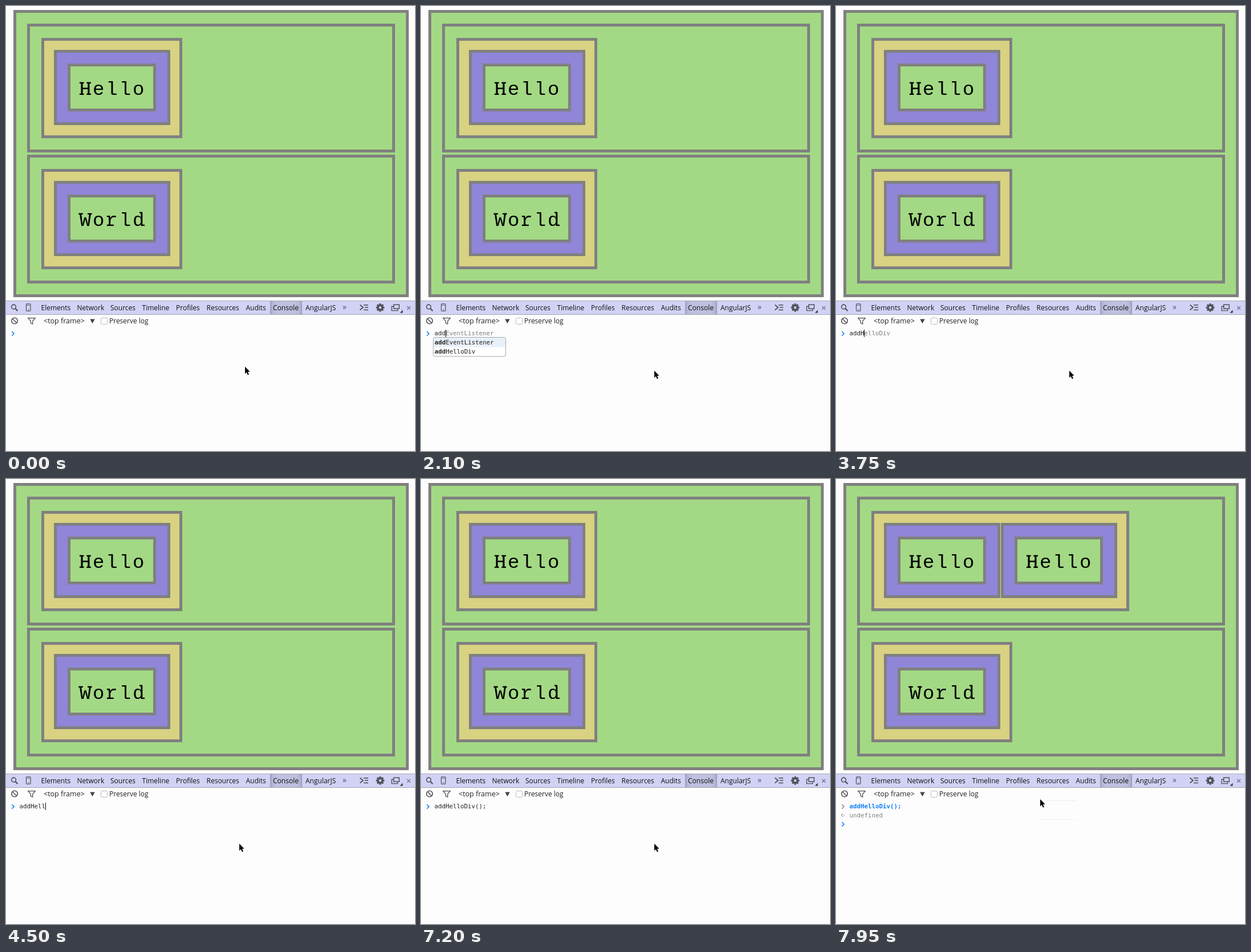
An HTML page with a canvas for the animation above (8 s loop, 717x781 px).

```html
<!DOCTYPE html>
<html lang="en">
<head>
<meta charset="utf-8">
<title>Console demo</title>
<style>
  html, body { margin: 0; width: 100%; height: 100%; overflow: hidden; background: #fdfdfd; }
  canvas { display: block; }
</style>
</head>
<body>
<canvas id="stage" width="717" height="781"></canvas>
<script>
const ctx = document.getElementById('stage').getContext('2d');
const LOOP = 8000;
const GREEN = '#a3d984', YELLOW = '#d8d282', PURPLE = '#8f86d9', GRAY = '#808080';
const BLUE = '#1080f5', ICON = '#505058', INK = '#222';
const UI = '"Open Sans", "Noto Sans", sans-serif';
const MONO = '10.8px "DejaVu Sans Mono", monospace';
const COMMAND = 'addHelloDiv();';
const PITCH = 6.5;

// [time, typed characters, inline hint, popup prefix length, caret]
const EVENT = 'addEventListener', DIV = 'addHelloDiv';
const STEPS = [
  [0, 0, '', 0, 0], [150, 0, '', 0, 1], [750, 0, '', 0, 0], [1200, 0, '', 0, 1],
  [1500, 1, '', 0, 1], [1800, 2, EVENT, 2, 1], [2100, 3, EVENT, 3, 1],
  [3600, 4, '', 3, 1], [3750, 4, DIV, 0, 1], [4200, 5, '', 0, 1],
  [4350, 6, DIV, 0, 1], [4500, 7, '', 0, 1], [4800, 8, '', 0, 1],
  [5100, 8, DIV, 0, 1], [5400, 9, '', 0, 1], [5550, 9, DIV, 0, 1],
  [5700, 10, '', 0, 1], [5850, 11, '', 0, 1], [6300, 13, '', 0, 1],
  [6750, 14, '', 0, 1], [7200, 14, '', 0, 0]
];
const RUN = 7350, CARET_OFF = 7800, LEAVE = 7950;

// Slab serifs as [left, right, height above baseline]
const SLABS = {
  H: [[1.6, 9.2, 0], [14, 21.6, 0], [1.6, 9.2, 20], [14, 21.6, 20]],
  W: [[0, 7.5, 20], [15.8, 23.3, 20]],
  r: [[3, 15, 0], [3, 8, 15.6]],
  d: [[18, 22.5, 0], [13.5, 18.2, 22.2]]
};

function rect(x, y, w, h, color) {
  ctx.fillStyle = color;
  ctx.fillRect(x, y, w, h);
}

function text(s, x, y, font, color = INK) {
  ctx.font = font;
  ctx.fillStyle = color;
  ctx.fillText(s, x, y);
}

function line(points, color = ICON, width = 1.5, close = false) {
  ctx.beginPath();
  points.forEach(([x, y]) => ctx.lineTo(x, y));
  if (close) ctx.closePath();
  ctx.strokeStyle = color;
  ctx.lineWidth = width;
  ctx.stroke();
}

function shape(points, color) {
  ctx.beginPath();
  points.forEach(([x, y]) => ctx.lineTo(x, y));
  ctx.closePath();
  ctx.fillStyle = color;
  ctx.fill();
}

function ring(x, y, r, width, color = ICON) {
  ctx.beginPath();
  ctx.arc(x, y, r, 0, Math.PI * 2);
  ctx.strokeStyle = color;
  ctx.lineWidth = width;
  ctx.stroke();
}

function box(x, y, right, bottom, color) {
  rect(x, y, right - x, bottom - y, GRAY);
  rect(x + 5, y + 5, right - x - 10, bottom - y - 10, color);
}

function word(s, x, y) {
  ctx.textAlign = 'center';
  [...s].forEach((ch, i) => {
    const left = x + i * 23.3;
    text(ch, left + 11.65, y, '34px "Liberation Mono", monospace', '#000');
    for (const [a, b, up] of SLABS[ch] || []) rect(left + a, y - up - 2.4, b - a, 2.4, '#000');
  });
  ctx.textAlign = 'left';
}

function card(s, x, y) {
  box(x, y, x + 204, y + 132, PURPLE);
  box(x + 24, y + 24, x + 179, y + 108, GREEN);
  word(s, x + 43.3, y + 79);
}

function row(s, y, count) {
  box(37, y, 682, y + 226, GREEN);
  box(62, y + 25, count > 1 ? 514 : 309, y + 201, YELLOW);
  for (let i = 0; i < count; i++) card(s, 84 + i * 205, y + 46.5 | 0);
}

function page(count) {
  box(13, 7, 706, 511, GREEN);
  row('Hello', 31, count);
  row('World', 261, 1);
}

function gear(x, y) {
  ctx.save();
  ctx.translate(x, y);
  for (let i = 0; i < 8; i++) {
    rect(-1.6, -7.3, 3.2, 4, ICON);
    ctx.rotate(Math.PI / 4);
  }
  ctx.restore();
  ring(x, y, 3.9, 3.4);
}

function tabs() {
  rect(0, 517, 717, 24, '#d2d2f6');
  rect(0, 517, 717, 1, '#a9a9b4');
  rect(0, 541, 717, 1, '#a5a5ad');

  const shade = ctx.createLinearGradient(463, 0, 519, 0);
  [[0, '#9898b2'], [0.06, '#b4b4d2'], [0.2, '#bfbfdf'], [0.8, '#bfbfdf'], [0.94, '#b4b4d2'], [1, '#9898b2']]
    .forEach(([at, color]) => shade.addColorStop(at, color));
  rect(463, 518, 56, 23, shade);

  const labels = [
    ['Elements', 61.5], ['Network', 124.5], ['Sources', 183], ['Timeline', 238.5],
    ['Profiles', 298], ['Resources', 351.5], ['Audits', 420.5], ['Console', 468], ['AngularJS', 525]
  ];
  labels.forEach(([s, x]) => text(s, x, 533.5, '12px ' + UI, '#111'));
  text('»', 590, 533, '14px ' + UI, ICON);

  ring(13.5, 528, 3.9, 1.6);
  line([[16.4, 531], [20.5, 535.3]], ICON, 2.3);

  ctx.beginPath();
  ctx.roundRect(35.5, 522.5, 7.5, 13, 1.5);
  ctx.strokeStyle = ICON;
  ctx.lineWidth = 1.2;
  ctx.stroke();
  rect(36, 524.5, 6.5, 1, ICON);
  rect(38, 533, 3, 1, ICON);

  line([[620.5, 524.5], [626, 529], [620.5, 533.5]], ICON, 1.8);
  rect(627, 524, 8, 1.6, ICON);
  rect(629, 528.2, 6, 1.6, ICON);
  rect(627, 532.6, 8, 1.6, ICON);
  gear(656, 529.3);

  ctx.strokeStyle = ICON;
  ctx.lineWidth = 1.5;
  ctx.strokeRect(679.7, 524.2, 9.6, 7);
  line([[679, 527.2], [676.2, 527.2], [676.2, 534.6], [686.5, 534.6], [686.5, 532]], ICON, 1.4);
  shape([[695.5, 533.5], [695.5, 538.5], [690.5, 538.5]], '#333');
  line([[703.2, 527], [709, 532.8]], '#77778a', 1.4);
  line([[709, 527], [703.2, 532.8]], '#77778a', 1.4);
}

function filters() {
  ring(15, 552.5, 5.3, 1.6);
  line([[11.3, 548.8], [18.7, 556.2]], ICON, 1.6);
  line([[38.8, 547.7], [51.2, 547.7], [46.7, 553], [46.7, 558], [43.3, 556.5], [43.3, 553]], ICON, 1.3, true);
  text('<top frame>', 66, 556.5, '12.5px ' + UI);
  shape([[147.3, 549.5], [155.7, 549.5], [151.5, 557.3]], '#444');
  ctx.beginPath();
  ctx.roundRect(166.5, 547.5, 11, 11, 2);
  ctx.fillStyle = '#fff';
  ctx.fill();
  ctx.strokeStyle = '#bbb';
  ctx.lineWidth = 1;
  ctx.stroke();
  text('Preserve log', 181, 556.8, '12px ' + UI);
}

function prompt(y, color) {
  line([[10.3, y - 3.7], [14, y], [10.3, y + 3.7]], color, 1.6);
}

function caret(n, y) {
  rect(Math.floor(24 + n * 6.49), y, 1, 13, '#111');
}

function popup(prefix) {
  ctx.beginPath();
  ctx.roundRect(21.5, 581.5, 127, 33.5, 3);
  ctx.fillStyle = '#fff';
  ctx.fill();
  rect(22, 582, 126, 16.5, '#e8f0fa');
  ctx.strokeStyle = '#a4a8ac';
  ctx.lineWidth = 1;
  ctx.stroke();
  [EVENT, DIV].forEach((s, i) => {
    const y = 593.5 + i * 16.3;
    text(s.slice(0, prefix), 23.7, y, 'bold ' + MONO);
    text(s.slice(prefix), 23.7 + prefix * PITCH, y, MONO);
  });
}

function typing(t) {
  const [, n, hint, prefix, blink] = STEPS.findLast(step => t >= step[0]);
  prompt(575, BLUE);
  text(COMMAND.slice(0, n), 23.5, 578, MONO);
  if (hint) text(hint.slice(n), 23.5 + n * PITCH, 578, MONO, GRAY);
  if (prefix) popup(prefix);
  if (blink) caret(n, 568);
}

function result(t) {
  prompt(575, '#8a8a8a');
  text(COMMAND, 23.5, 578, 'bold ' + MONO, BLUE);
  line([[12.3, 587], [9.5, 590], [12.3, 593]], '#a0a0a0', 1.2);
  rect(13.5, 589.3, 1.8, 1.4, '#a0a0a0');
  text('undefined', 23.5, 593.7, MONO, GRAY);
  prompt(606, BLUE);
  if (t < CARET_OFF) caret(0, 599);
}

function pointer(x, y) {
  const arrow = [[0, 0], [0, 12.4], [2.8, 9.8], [4.8, 14.6], [6.9, 13.7], [4.9, 9.1], [8.5, 8.8]]
    .map(([dx, dy]) => [x + dx, y + dy]);
  line(arrow, '#fff', 1.8, true);
  shape(arrow, '#000');
}

function draw(t) {
  rect(0, 0, 717, 781, '#fdfdfd');
  page(t < RUN ? 1 : 2);
  tabs();
  filters();
  if (t < RUN) typing(t);
  else result(t);

  if (t < 150) {
    pointer(419, 633);
  } else if (t < LEAVE) {
    pointer(409, 640);
  } else {
    rect(370, 564, 52, 1, '#ececec');
    rect(355, 597, 66, 1, '#f0f0f0');
    pointer(358, 562);
  }
}

const start = performance.now();
function tick() {
  draw((performance.now() - start) % LOOP);
  requestAnimationFrame(tick);
}
tick();
</script>
</body>
</html>
```
